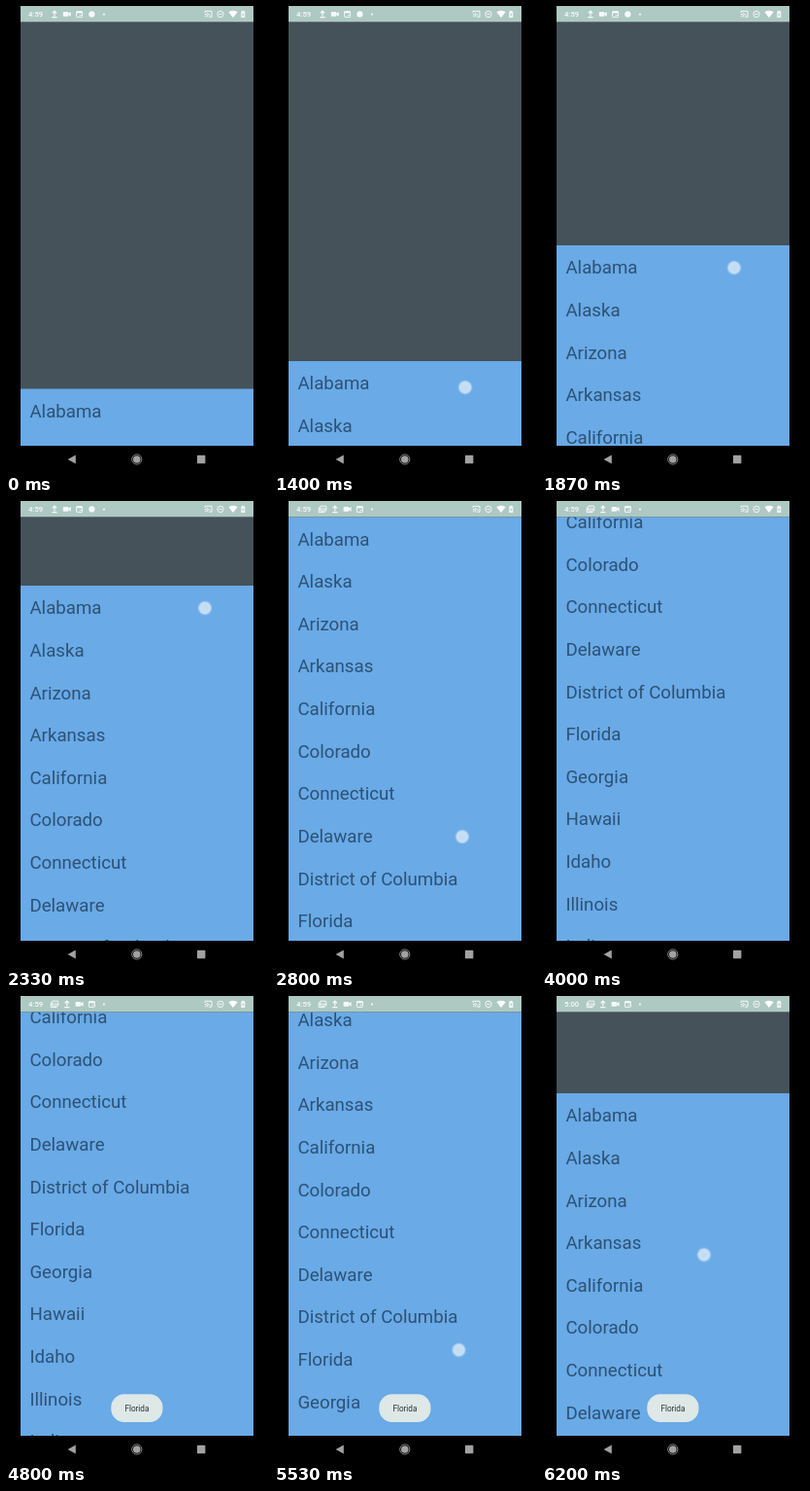
Write an HTML page that moves like this. It is 270 px wide and 480 px high and loops after 6.27 s.

```html
<!DOCTYPE html>
<html lang="en">
<head>
<meta charset="utf-8">
<title>Bottom sheet list</title>
<style>
  html, body { margin: 0; width: 100%; height: 100%; overflow: hidden; background: #000; }
  svg { display: block; width: 100%; height: 100%; }
  text { font-family: Roboto, "Open Sans", sans-serif; }
  #rows text { font-size: 18.7px; fill: #2d5275; }
  #clock { font-size: 7.7px; font-weight: 500; fill: #f6fbfa; }
  #toast text { font-size: 8.2px; fill: #2b3234; text-anchor: middle; }
</style>
</head>
<body>
<svg viewBox="0 0 270 480">
  <defs>
    <clipPath id="screen"><rect x="15" y="16.3" width="240" height="435.7"/></clipPath>
    <radialGradient id="glow">
      <stop offset="0" stop-color="#c2dcf3"/>
      <stop offset=".66" stop-color="#c6dff4"/>
      <stop offset=".78" stop-color="#a5cbef" stop-opacity=".8"/>
      <stop offset="1" stop-color="#7db4ea" stop-opacity="0"/>
    </radialGradient>
    <g id="upload" fill="none" stroke="#f4faf8" stroke-width="1.2">
      <path d="M0 2V-3M-2.2-1L0-3.3L2.2-1M-2.6 3.3H2.6"/>
    </g>
    <g id="camera" fill="#f4faf8">
      <rect x="-4" y="-2.4" width="5.6" height="4.8" rx=".7"/>
      <path d="M1.4-.6L4-2.3V2.3L1.4.6z"/>
    </g>
    <g id="calendar" fill="none" stroke="#f4faf8">
      <rect x="-3" y="-2.8" width="6" height="5.8" rx=".6"/>
      <path d="M-3-1.9H3" stroke-width="1.6"/>
      <path d="M.2 1H2"/>
    </g>
    <g id="image" fill="none" stroke="#f4faf8">
      <path d="M-3.8-1.8V3.2H2.4"/>
      <rect x="-2.4" y="-3.2" width="6.2" height="4.9" rx=".5"/>
      <path d="M-1.8 1L0-1L1 .2L2-.8L3.4 1"/>
    </g>
    <circle id="badge" r="3.1" fill="#f4faf8"/>
  </defs>

  <rect width="270" height="480"/>
  <rect x="15" width="240" height="452" fill="#455259"/>
  <g clip-path="url(#screen)">
    <g id="sheet">
      <rect x="15" width="240" height="480" fill="#69aae7"/>
      <g id="rows"></g>
    </g>
  </g>

  <rect x="15" width="240" height="16.3" fill="#aec8c2"/>
  <text id="clock" x="23" y="11.3"></text>
  <g id="icons"></g>
  <circle cx="101" cy="8.5" r="1.1" fill="#f4faf8"/>
  <g fill="none" stroke="#f4faf8">
    <path d="M205 7V5.3H212V11.2H209.5M205 8.3A3 3 0 0 1 208 11.3M205 10.2A1.2 1.2 0 0 1 206.2 11.4M207 7L210.5 10"/>
    <circle cx="221" cy="8.4" r="3.2"/>
    <path d="M219.4 8.4H222.6"/>
  </g>
  <path d="M229.4 6.2Q234 3.4 238.6 6.2L234 12z" fill="#fff"/>
  <path d="M242.3 5.6H243.4V4.7H245.2V5.6H246.3V12H242.3z" fill="#f4faf8"/>
  <path d="M244.6 6.7L243.2 9.2H244.2V11L245.5 8.5H244.6z" fill="#aec8c2"/>

  <g fill="#a2a2a2">
    <path d="M63.6 466L71.8 461.4V470.6z"/>
    <circle cx="134.8" cy="466" r="3.8"/>
    <circle cx="134.8" cy="466" r="5.1" fill="none" stroke="#929292" stroke-width=".9"/>
    <rect x="197" y="461.8" width="8.4" height="8.4" rx=".6"/>
  </g>

  <g id="toast">
    <rect x="108.3" y="409.3" width="53.2" height="28.7" rx="13.5" fill="#dde8e7"/>
    <text x="134.9" y="426.7">Florida</text>
  </g>
  <circle id="dot" r="8.4" fill="url(#glow)"/>
</svg>
<script>
const LOOP = 6270, STEP = 1000 / 15, ROW = 43.62;
const $ = id => document.getElementById(id);

const states = ["Alabama", "Alaska", "Arizona", "Arkansas", "California", "Colorado",
  "Connecticut", "Delaware", "District of Columbia", "Florida", "Georgia", "Hawaii",
  "Idaho", "Illinois", "Indiana", "Iowa"];
$("rows").innerHTML = states.map((name, i) =>
  `<text x="24.4" y="${(29.3 + i * ROW).toFixed(2)}">${name}</text>`).join("");

// Tracks: [ms, value, ...]
const sheetTop = [[870, 393.5], [1070, 388], [1270, 379], [1400, 365], [1600, 321], [1870, 246],
  [1930, 222], [2130, 157], [2330, 87], [2460, 42], [2540, 16.3],
  [5930, 16.3], [6000, 30], [6200, 100]];
const scroll = [[2800, 0], [2930, 32], [3070, 88], [3200, 132], [3330, 163], [3400, 171.5],
  [3600, 183], [3870, 192], [5200, 192], [5330, 150], [5470, 84], [5600, 28], [5730, 0]];
const touches = [
  [[670, 195, 424], [870, 195, 420], [1270, 196, 406], [1400, 197, 392], [1600, 197, 346],
    [1870, 198, 269], [1930, 199, 245], [2330, 205, 110], [2530, 207, 42]],
  [[2730, 194, 352], [2800, 194, 345], [2930, 194, 313], [3070, 193, 257], [3200, 193, 213],
    [3330, 192, 182], [3400, 192, 173], [3600, 192, 161], [3870, 191, 152]],
  [[4330, 70, 249], [4660, 70, 249]],
  [[5130, 192, 225], [5200, 192, 226], [5330, 192, 272], [5470, 191, 338], [5600, 190, 394]],
  [[5930, 166, 176], [6000, 166, 196], [6200, 167, 266], [LOOP, 167, 266]]
];
const toastFade = [[4460, 0], [4730, 1]];

function at(track, t, k = 1) {
  const i = track.findIndex(p => p[0] > t);
  if (i === 0) return track[0][k];
  if (i < 0) return track[track.length - 1][k];
  const a = track[i - 1], b = track[i];
  return a[k] + (b[k] - a[k]) * (t - a[0]) / (b[0] - a[0]);
}

const iconSets = [
  ["upload", "camera", "calendar", "badge"],
  ["image", "upload", "camera", "calendar"]
];
let shownSet = -1;

function showIcons(n) {
  if (n === shownSet) return;
  shownSet = n;
  $("icons").innerHTML = iconSets[n].map((id, i) =>
    `<use href="#${id}" x="${50 + i * 12.8}" y="8.4"/>`).join("");
}

function draw(t) {
  $("sheet").setAttribute("transform", `translate(0 ${at(sheetTop, t)})`);
  $("rows").setAttribute("transform", `translate(0 ${-at(scroll, t)})`);
  $("toast").setAttribute("opacity", at(toastFade, t));
  $("clock").textContent = t < 5930 ? "4:59" : "5:00";
  showIcons(t < 2800 ? 0 : 1);

  const touch = touches.find(p => t >= p[0][0] && t <= p[p.length - 1][0]);
  $("dot").style.display = touch ? "" : "none";
  if (touch) {
    $("dot").setAttribute("cx", at(touch, t, 1));
    $("dot").setAttribute("cy", at(touch, t, 2));
  }
}

const start = performance.now();
function tick() {
  const t = (performance.now() - start) % LOOP;
  const step = Math.floor((t + 4) / STEP);
  draw(Math.round(step * STEP / 10) * 10 % LOOP);
  requestAnimationFrame(tick);
}
tick();
</script>
</body>
</html>
```
